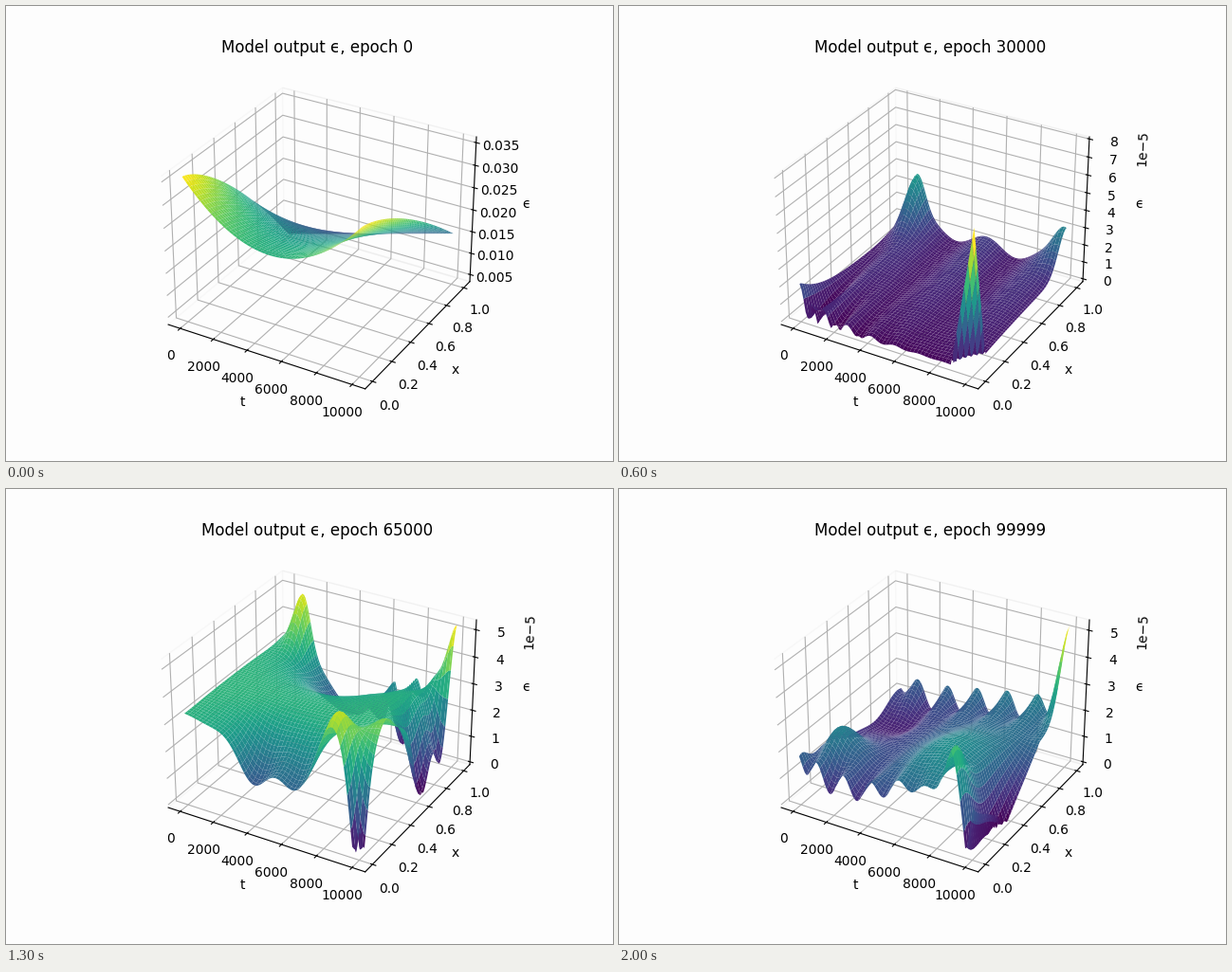
A matplotlib script for the animation above (2.1 s loop, 640 px wide and 480 px high).

```python
import numpy as np
import matplotlib.pyplot as plt
from matplotlib.animation import FuncAnimation

FRAMES = 21
BACK = "#fdfdfd"

u = np.linspace(0, 1, 100)
T, X = np.meshgrid(u, u)
EDGE = (2 * T - 1) ** 2  # 0 in the middle of the time range, 1 at both ends


def bump(t, x, wt, wx):
    return np.exp(-((T - t) / wt) ** 2 - ((X - x) / wx) ** 2)


def wave(crest, period):
    return np.cos(2 * np.pi * (T - crest) / period)


def trough():
    front = .63 + .36 * EDGE
    return front + (.35 * T - front) * X ** 1.4


def bowl():
    z = .22 + .55 * X ** 2 + .06 * wave(.42, .7) * X
    z += .55 * bump(0, .16, .08, .1) + .45 * bump(0, .77, .06, .12)
    z += .45 * bump(.42, .14, .13, .13) + .45 * bump(1, .1, .06, .09)
    z -= .25 * bump(.87, 0, .09, .1) + .12 * bump(.15, 0, .1, .08)
    z -= .35 * bump(1, .47, .08, .12) + .35 * bump(1, .77, .07, .14)
    return z + .22 * bump(.85, .62, .12, .15) + .2 * bump(1, 1, .05, .06)


def spike():
    z = .02 + .1 * np.sqrt(X) + .05 * wave(.53, .36) * X
    z += .24 * wave(0, .14) * np.exp(-6 * T - 5 * X)
    z += .36 * bump(.1, 1, .07, .16) + .3 * bump(1, 1, .09, .12)
    return z + np.clip(1 - (1 - T) / .12 - X / .13, 0, 1)


def peaks():
    """Evenly spaced crests around the rim, alternating in sign."""
    z = .36 * bump(.63, .5, .18, .16) + .06 * wave(0, .5) * np.cos(12 * X)
    z -= .6 * bump(.11, .02, .05, .08)
    crests = [1, .4, .95, .3, .43, .6, .67, .1, .28, .22, .52, .52, .24, .1]
    for k, h in enumerate(crests):
        side, r = divmod(4 * k / len(crests), 1)
        t, x = [(r, .03), (1, r), (1 - r, 1), (0, 1 - r)][int(side)]
        z += (-1) ** k * h * bump(t, x, .07, .1)
    return z


def folds():
    z = .64 - .45 * bump(.42, 1, .24, .3) - .36 * bump(.5, 0, .25, .2)
    z += .09 * wave(.52, .31) * bump(.5, 0, .25, .15)
    z += .38 * bump(.1, 1, .06, .12) - .25 * bump(.72, 1, .12, .15)
    z += .25 * wave(.65, .13) * bump(.7, 1, .12, .12)
    z += .3 * bump(.84, .06, .09, .13) + .15 * bump(1, .25, .1, .1)
    z -= .85 * bump(1, 0, .07, .09) + .65 * bump(1, .66, .08, .13)
    return z - .5 * bump(1, .87, .07, .08) + .4 * bump(1, 1, .06, .08)


def furrows():
    z = .18 + .35 * X ** 1.2 + .12 * EDGE
    ripple = wave(.43 + .03 * X, .2) * (1 - EDGE ** 2)
    z += .13 * ripple * (.35 + .65 * (2 * X - 1) ** 2)
    return z + .36 * bump(0, 1, .07, .13) + .32 * bump(1, 1, .06, .12)


def final():
    z = .2 + .22 * T * X + .12 * wave(.42, .16) * np.exp(-X / .12) * (1 - T)
    z += .1 * wave(.47, .18) * np.exp((X - 1) / .12) + .12 * bump(0, 1, .1, .2)
    z += .22 * bump(0, 0, .04, .1) + .25 * bump(.12, .22, .13, .16)
    z += .28 * bump(.7, .25, .25, .4) + .45 * bump(.9, .02, .08, .14)
    z -= .7 * np.clip(1 - (1 - T) / .12, 0, 1) * np.clip(1 - X / .7, 0, 1)
    return z - .12 * bump(.12, .75, .15, .18) + .55 * bump(1, 1, .06, .12)


# step, surface, lowest and highest value
KEYS = [
    (0, trough, .0040, .0356), (2, bowl, 1.6e-5, 1.66e-4),
    (6, spike, 0, 7.95e-5), (9, peaks, 0, 5.57e-5), (13, folds, 0, 5.25e-5),
    (17, furrows, 1.94e-5, 1.19e-4), (20, final, 0, 5.27e-5),
]
steps, forms, lows, highs = zip(*KEYS)


def shape(form, lo):
    """Unit-height surface; it stays signed where the values reach zero."""
    z = form()
    if lo:
        z = z - z.min()
    return z / np.abs(z).max()


shapes = [shape(f, lo) for f, lo in zip(forms, lows)]
floors = np.divide(lows, highs)


def surface(i):
    k = min(np.searchsorted(steps, i, side="right") - 1, len(steps) - 2)
    f = (i - steps[k]) / (steps[k + 1] - steps[k])
    z = np.abs((1 - f) * shapes[k] + f * shapes[k + 1])
    z = (z - z.min()) / (z.max() - z.min())
    floor = np.interp(i, steps, floors)
    return (floor + (1 - floor) * z) * np.exp(np.interp(i, steps, np.log(highs)))


fig = plt.figure(figsize=(6.4, 4.8), dpi=100, facecolor=BACK)
ax = fig.add_subplot(projection="3d", facecolor=BACK)


def draw(i):
    ax.clear()
    for axis in (ax.xaxis, ax.yaxis, ax.zaxis):
        axis.pane.set_fill(False)
    ax.plot_surface(T * 10000, X, surface(i), cmap="viridis")
    ax.set_xlabel("t")
    ax.set_ylabel("x")
    ax.set_zlabel("ϵ")
    ax.set_title(f"Model output ϵ, epoch {min(5000 * i, 99999)}")
    return []


anim = FuncAnimation(fig, draw, frames=FRAMES, interval=100, repeat=True,
                     repeat_delay=0, blit=False)
plt.show()
```
